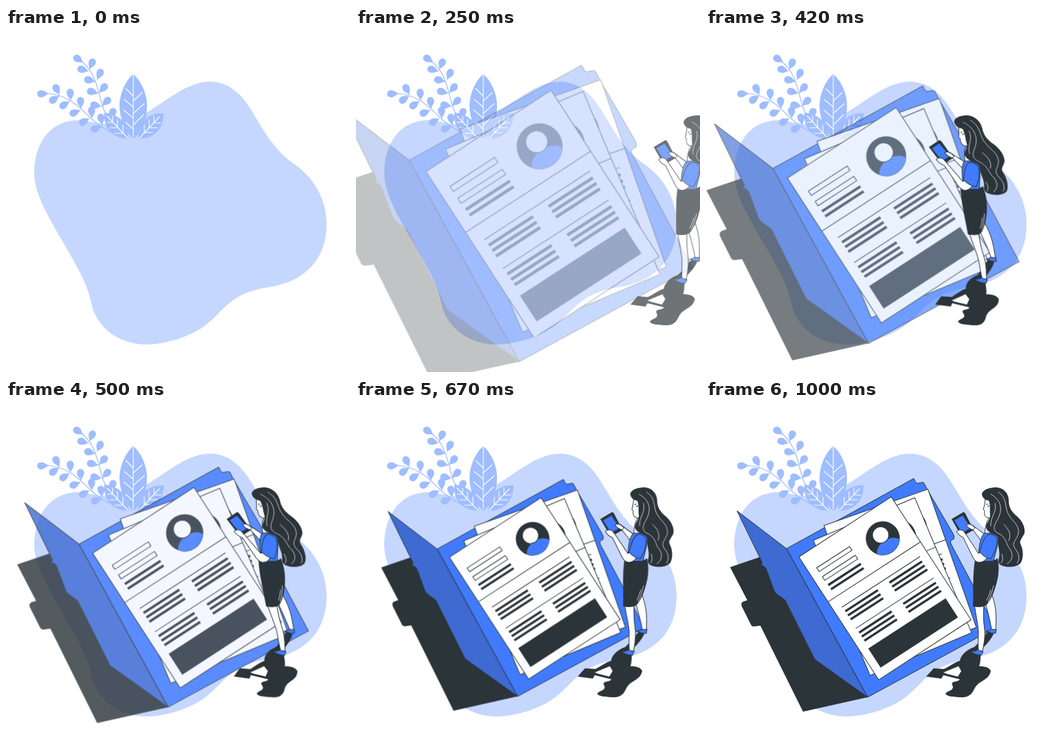
Animation of 500 by 500 pixels, one loop 1040 ms. Source, as an HTML page:

```html
<!DOCTYPE html>
<html lang="en">
<head>
<meta charset="utf-8">
<title>Reading the file</title>
<style>
  html, body { margin: 0; width: 100%; height: 100%; overflow: hidden; background: #fff; }
  svg { display: block; width: 100vw; height: 100vh; }
  #folder, #girl { transform-box: view-box; }
  #folder { transform-origin: 229px 283px; }
  #girl { transform-origin: 250px 278px; }
  .ink { fill: #2b3439; }
  .blue { fill: #407bff; }
  .pale { fill: #9fbdff; }
  .white { fill: #fff; }
  .edge { stroke: #2b3439; stroke-width: 1; stroke-linejoin: round; }
  .line { fill: none; stroke: #2b3439; stroke-width: 1; }
  .vein { fill: none; stroke: #fff; stroke-width: 1.1; stroke-linecap: round; }
  .stem { fill: none; stroke: #9fbdff; stroke-width: 1.2; }
  .strand { fill: none; stroke: #fff; stroke-width: .7; stroke-linecap: round; }
</style>
</head>
<body>
<svg viewBox="0 0 500 500">
  <defs>
    <clipPath id="disc"><circle cx="117" cy="43.8" r="24.2"/></clipPath>
    <g id="page"></g>
  </defs>

  <path fill="#c5d7ff" d="M41 210C42 160 70 134 105 134C140 138 165 150 206 122C240 101 265 78 297 78C325 78 343 98 355 117C370 140 386 175 418 197C447 217 466 248 466 285C466 340 430 370 380 377C325 386 318 410 290 432C268 449 230 460 205 460C165 460 132 437 124 400C119 370 95 333 78 303C60 271 41 240 41 210Z"/>

  <g id="plant">
    <path class="stem" d="M108 47C130 64 132 85 138 105C142 122 150 138 166 154"/>
    <path class="stem" d="M58 95C90 97 104 113 120 128C136 144 155 155 178 160"/>
    <path class="pale" d="M185 67C198 78 205 98 205 113C205 135 196 150 187 160H184C173 150 165 132 165 113C165 97 173 77 185 67Z"/>
    <path class="pale" d="M193 161C190 142 203 123 229 124C229 148 214 161 193 161Z"/>
    <path class="pale" d="M178 161C156 161 141 146 143 123C165 125 179 140 178 161Z"/>
    <path class="vein" d="M185 68V158M185 106L198 94M185 124L201 110M185 141L200 126M185 99L174 88M185 115L172 104M185 131L171 119M185 147L174 137"/>
    <path class="vein" d="M194 160L223 129M201 152V141M208 145V133M215 138V128M201 152H213M208 145H220M215 138H225"/>
    <path class="vein" d="M177 160L147 128M170 153V141M162 145V133M155 137V128M170 153H158M162 145H151M155 137H147"/>
  </g>

  <g id="folder">
    <path class="ink" d="M35 243L82 227L235 432L141 453L79 328L71 329Q67 330 65 326L52 300Q50 295 54 293L60 291Z"/>
    <path class="blue edge" d="M117 216L302 114C304 117 304 120 307 121C311 121 315 118 317 121L321 129L359 194Q362 199 360 202Q354 204 356 209L421 331L235 432Z"/>
    <use href="#page" transform="translate(171.5 182.5) rotate(-19.3)"/>
    <use href="#page" transform="translate(156 204) rotate(-22.8)"/>
    <use href="#page" transform="translate(135 228) rotate(-33)"/>
    <path class="edge" fill="#3e6ad1" d="M45 161L117 216L235 432L158 377L115 291L104 283Q101 281 99 277L88 247Q86 241 79 240L82 237Z"/>
  </g>

  <g id="girl">
    <path class="ink" fill-rule="evenodd" d="M419 337C415 350 405 356 401 363C398 372 400 380 397 387C404 387 412 388 414 394C412 402 408 404 404 407C397 411 393 414 390 420C386 429 380 433 368 432C358 431 350 431 348 427C350 423 356 423 358 420C361 416 356 414 358 411C362 408 366 410 369 406L345 400L342 405L320 402L331 390L346 391C352 388 362 381 369 379C371 368 382 362 390 359C398 352 404 342 411 336ZM345 396L367 387L371 394L366 402L350 398Z"/>
    <path class="blue edge" d="M407 336Q413 336 416 331L422 333L421 339Q414 340 407 336Z"/>
    <path class="white edge" d="M405 290C409 306 413 320 415 333L421 334C422 320 423 304 416 284Z"/>
    <path class="blue edge" d="M384 365Q392 366 396 362L403 366L400 371Q391 371 384 365Z"/>
    <path class="white edge" d="M390 296C392 312 395 324 396 336C396 346 395 356 396 364L402 365C404 354 406 345 405 334C403 320 403 310 404 296Z"/>
    <path class="ink" d="M391 232C399 234 416 236 424 230C428 250 423 266 418 280C413 292 409 298 404 300Q396 302 388 300C389 280 387 256 391 232Z"/>
    <path class="strand" d="M418 270Q414 286 410 293M414 276Q411 286 408 291"/>
    <path class="white edge" d="M406 196L394 187L386 181Q380 179 378 181Q380 184 384 186L389 190L401 206Z"/>
    <path class="ink" d="M357 173L374 163Q376 163 377 165L389 189L373 198Q371 198 370 196Z"/>
    <path class="blue" d="M361 175L373 168L385 186L372 193Z"/>
    <path class="white edge" d="M378 181Q383 179 387 182L391 186L388 189L382 186Z"/>
    <path class="white edge" d="M405 196C406 185 407 176 413 170L420 196Z"/>
    <path class="blue edge" d="M404 194C412 192 424 194 425 201C424 214 420 224 418 234L395 235C397 222 396 204 404 194Z"/>
    <path class="white edge" d="M364 191Q368 187 374 190L379 197L396 223L402 220L410 227Q405 236 397 236Q392 236 388 229L374 200Q367 197 364 191Z"/>
    <path class="blue edge" d="M410 196C403 201 400 212 398 221Q404 229 414 231C420 221 424 210 423 202Q418 193 410 196Z"/>
    <path class="white edge" d="M406 144C405 150 405 154 403 159L405 161C404 165 405 170 409 171L415 172L422 150Z"/>
    <path class="line" d="M407 152L410 151M409 154Q411 156 412 153"/>
    <path class="ink" d="M401 136C404 129 413 127 423 127C433 128 440 136 440 146C440 157 445 163 452 169C460 176 464 185 463 193C461 200 455 203 457 209C461 217 462 228 458 236C453 243 440 244 431 241C425 239 424 235 426 229C428 219 423 212 425 203C424 194 413 196 408 188C404 181 413 176 413 168C412 160 414 154 411 146C406 146 401 142 401 136Z"/>
    <path class="strand" d="M414 137C425 143 431 153 427 166C424 177 413 185 423 193C438 199 436 211 442 217C448 226 444 234 438 238"/>
    <path class="strand" d="M425 134C438 142 434 155 439 165C445 177 456 181 454 194C451 205 443 207 450 217C456 224 456 233 452 237"/>
    <path class="strand" d="M420 150C424 162 412 172 414 183M433 181C441 189 444 196 440 204M430 224Q433 232 429 237"/>
  </g>
</svg>

<script>
const $ = id => document.getElementById(id);

// Leaves: base x, base y, angle in degrees
const leaves = [
  [113, 51, 215], [121, 61, -68], [132, 76, -66], [135, 95, -50], [139, 114, -45], [149, 132, -58],
  [121, 63, 195], [131, 78, 193], [135, 95, 193], [140, 114, 190],
  [63, 95, 177], [78, 98, -116], [94, 106, -93], [109, 118, -93], [125, 132, -93], [140, 142, -100],
  [78, 98, 146], [93, 106, 146], [109, 119, 157], [122, 131, 150], [140, 142, 157]
];
$('plant').insertAdjacentHTML('afterbegin', leaves.map(([x, y, a]) =>
  `<path class="pale" transform="translate(${x} ${y}) rotate(${a})"
    d="M0 0C5-1 7-5.5 12.5-5.2C19.5-4.5 19.5 4.5 12.5 5.2C7 5.5 5 1 0 0Z"/>`).join(''));

// Sheet of paper in its own upright coordinates
const bar = (x, y, w = 56.5, h = 3.3) => `<rect class="ink" x="${x}" y="${y}" width="${w}" height="${h}"/>`;
const box = (x, y, w, h) => `<rect class="white edge" x="${x}" y="${y}" width="${w}" height="${h}"/>`;
const rule = (x, y, end) => `<path class="line" d="M${x} ${y}H${end}"/>`;
const block = y => rule(12.5, y, 148) +
  [7, 14, 21].map(d => bar(13.5, y + d - 1) + bar(90, y + d - 1)).join('');

$('page').innerHTML = box(0, 0, 160, 213) +
  box(13, 27.5, 57, 6.5) + box(13, 42.7, 57, 6.5) + bar(13.5, 56) + bar(13.5, 63.2) +
  `<circle class="ink" cx="117" cy="43.8" r="24.7"/>
   <ellipse class="blue" cx="117" cy="64" rx="21" ry="16" clip-path="url(#disc)"/>
   <circle class="white edge" cx="117" cy="38" r="11.8"/>` +
  rule(0, 78, 160) + block(95.5) + block(132.3) + bar(12, 166.7, 134, 33);

const LOOP = 1040, FPS = 24, LEAD = 34;
const easing = 'cubic-bezier(.36,-.01,.5,1.38)';
const options = { duration: 1000, fill: 'both' };
const parts = [$('folder'), $('girl')];

const moves = [
  parts[0].animate([
    { opacity: 0, transform: 'scale(1.5)', easing },
    { opacity: 1, transform: 'scale(1)' }
  ], options),
  parts[1].animate([
    { offset: 0, opacity: 0, transform: 'translateX(250px) skewX(-20deg)', easing },
    { offset: .6, opacity: 1, transform: 'translateX(0px) skewX(10deg)', easing },
    { offset: .8, opacity: 1, transform: 'translateX(0px) skewX(-2deg)', easing },
    { offset: 1, opacity: 1, transform: 'translateX(0px) skewX(0deg)' }
  ], options)
];
moves.forEach(m => m.pause());

const start = performance.now();
function draw(now) {
  const time = Math.max(0, now - start) % LOOP;
  const step = Math.floor((time + 5.01) * FPS / 1000);
  const at = Math.min(1000, step * 1000 / FPS + LEAD);
  moves.forEach(m => { m.currentTime = at; });
  parts.forEach(p => { p.style.visibility = step < 2 ? 'hidden' : 'visible'; });
  requestAnimationFrame(draw);
}
draw(start);
</script>
</body>
</html>
```
